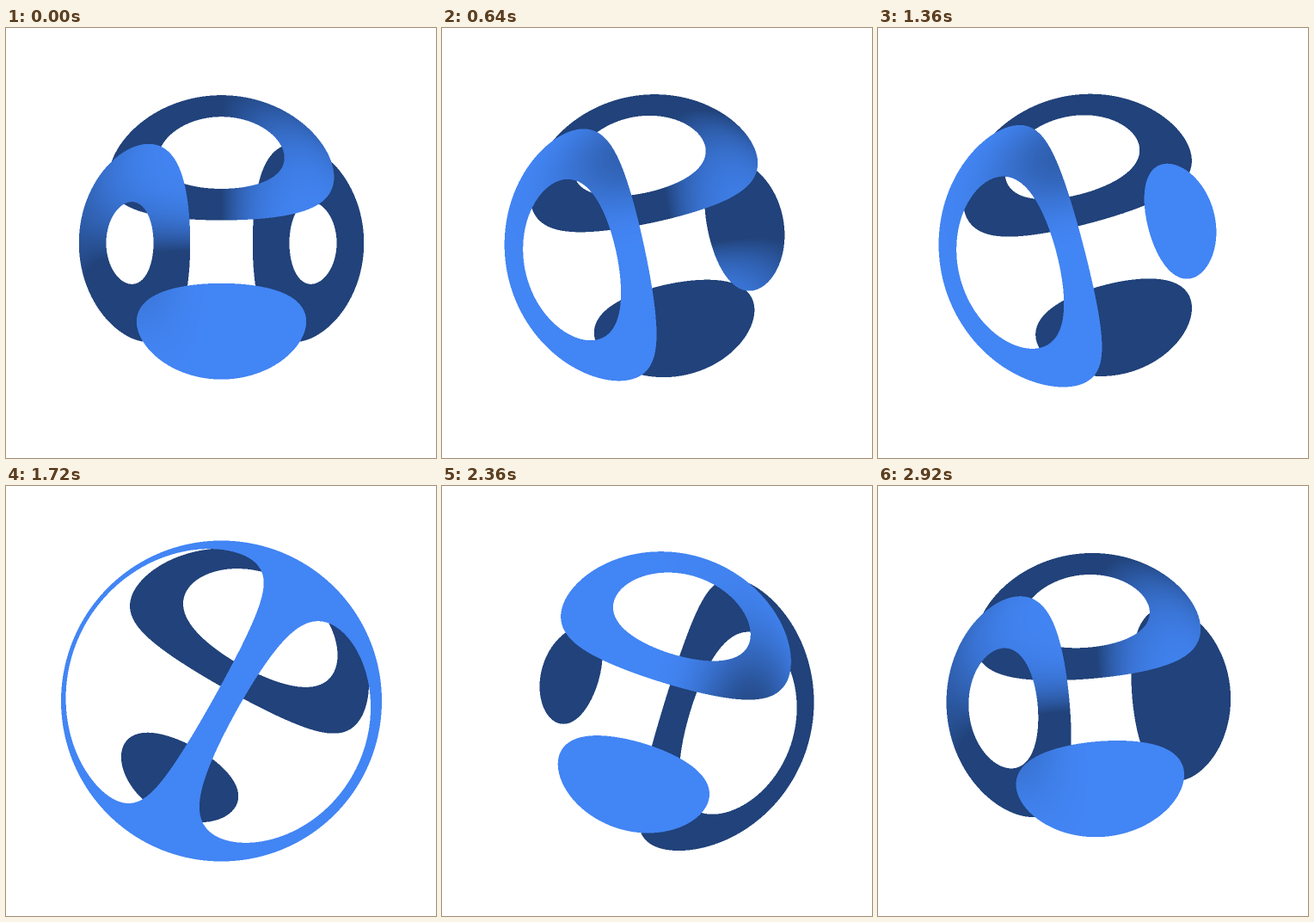
Write an HTML page with a canvas that moves like this. It is 500 px wide and 500 px high and loops after 2960 ms.

```html
<!DOCTYPE html>
<html lang="en">
<head>
<meta charset="utf-8">
<title>Woven lens</title>
<style>
  html, body { margin: 0; width: 100%; height: 100%; overflow: hidden; background: #fff; }
  canvas { display: block; width: 500px; height: 500px; }
</style>
</head>
<body>
<canvas id="stage" width="500" height="500"></canvas>
<script>
// A flat weave of ribbons turns about a pivot and is seen through a round lens.
const SIZE = 500, CX = 250.5, CY = 250, RADIUS = 186.5;
const STEP_MS = 40, STEPS = 74;
const PITCH = 100, HALF_WIDTH = 15;
const LENS = 187, PIVOT = 91;
const BRIGHT = [66, 133, 244];
const SUB = [0.25, 0.75];

const ctx = document.getElementById('stage').getContext('2d');
const image = ctx.createImageData(SIZE, SIZE);
image.data.fill(255);

// The lens never moves, so each subsample's place on the weave is found once.
const pixels = [], points = [];
for (let y = 0; y < SIZE; y++) {
  for (let x = 0; x < SIZE; x++) {
    if (Math.hypot(x + 0.5 - CX, y + 0.5 - CY) > RADIUS + 1) continue;
    pixels.push((y * SIZE + x) * 4);
    for (const dy of SUB) for (const dx of SUB) {
      const px = (x + dx - CX) / RADIUS, py = (CY - y - dy) / RADIUS;
      const bend = LENS * (1 - px * px - py * py);
      if (bend > 0) points.push(px * bend, py * bend - PIVOT);
      else points.push(NaN, NaN);
    }
  }
}
const weave = new Float32Array(points);

const onRibbon = (v, cell) => Math.abs(v - (cell + 0.5) * PITCH) < HALF_WIDTH;

// A ribbon leaves the dark at a cell's edge and eases to full light across that cell.
function fadeIn(distance) {
  const rest = 1 - Math.min(1, Math.max(0, distance / PITCH));
  return 1 - rest ** 3;
}

// Light of the topmost ribbon: 0 dark to 1 bright, or -1 between ribbons.
function lightAt(a, b) {
  const i = Math.floor(a / PITCH), j = Math.floor(b / PITCH);
  const first = onRibbon(a, i), second = onRibbon(b, j);
  if (first && (j > i || !second)) return fadeIn(b - (i + 1) * PITCH);
  if (second) return fadeIn(a - j * PITCH);
  return -1;
}

function draw(angle) {
  const sin = Math.sin(angle), cos = Math.cos(angle), samples = SUB.length ** 2;
  let k = 0;
  for (const at of pixels) {
    let covered = 0, glow = 0;
    for (let s = 0; s < samples; s++, k += 2) {
      const x = weave[k], y = weave[k + 1];
      const light = lightAt(x * sin + y * cos, x * cos - y * sin);
      if (light >= 0) {
        covered++;
        glow += 0.5 + 0.5 * light;
      }
    }
    for (let c = 0; c < 3; c++) {
      image.data[at + c] = (BRIGHT[c] * glow + 255 * (samples - covered)) / samples;
    }
  }
  ctx.putImageData(image, 0, 0);
}

const start = performance.now();
let shown = -1;
function tick() {
  const step = Math.floor((performance.now() - start) / STEP_MS) % STEPS;
  if (step !== shown) {
    shown = step;
    draw(step / STEPS * 2 * Math.PI);
  }
  requestAnimationFrame(tick);
}
tick();
</script>
</body>
</html>
```
